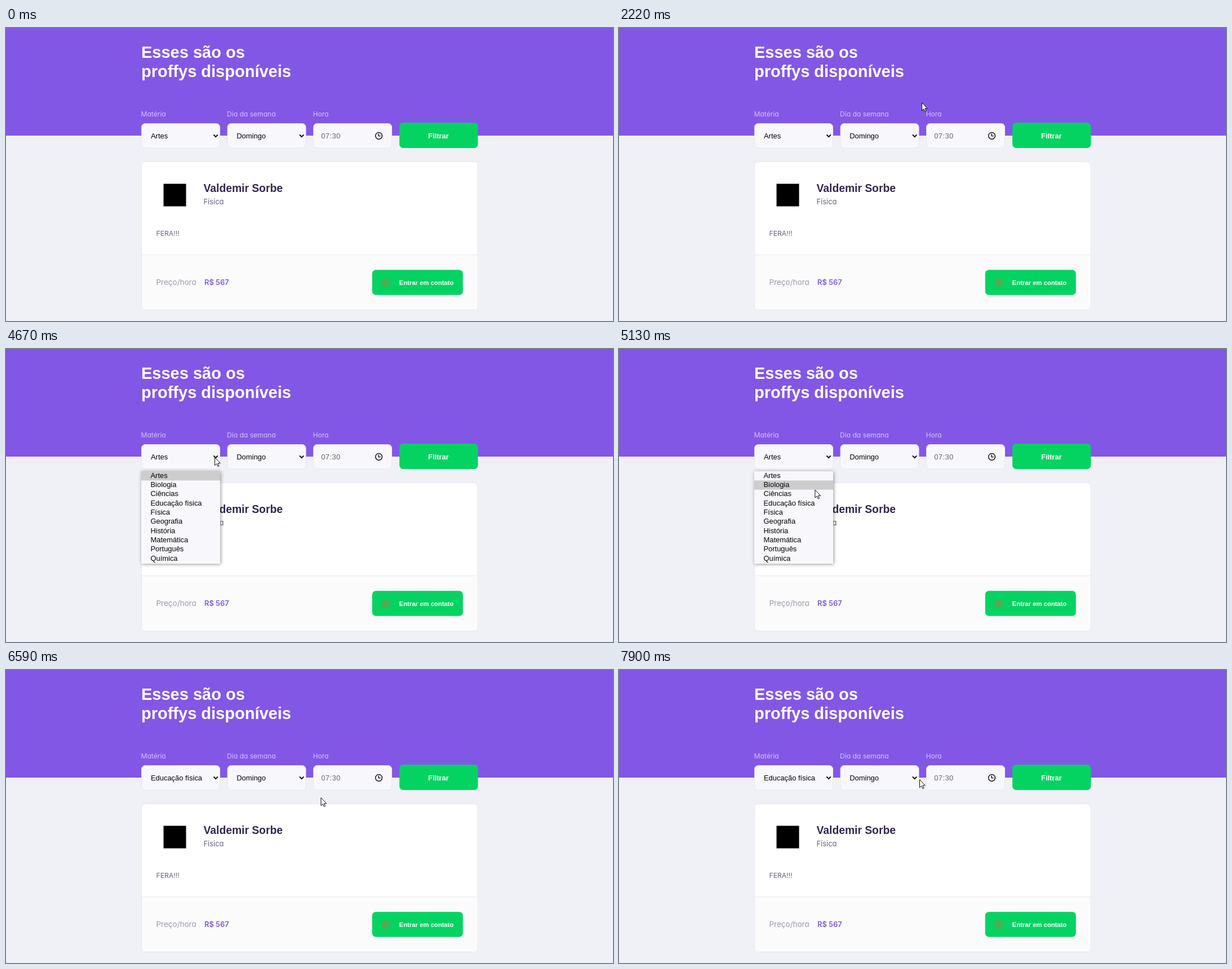
These frames come from a looping animation (1077 px wide and 520 px high, 8 s). An HTML page:

```html
<!DOCTYPE html>
<html lang="pt-BR">
<head>
<meta charset="utf-8">
<title>Proffys disponíveis</title>
<style>
  html, body { margin: 0; width: 100%; height: 100%; overflow: hidden; background: #f0f0f7; }
  svg, #shell { position: absolute; left: 0; top: 0; }
  #shell {
    left: 240px; top: 217px; width: 140px; height: 163.5px;
    background: rgba(0, 0, 0, .008);
    box-shadow: 1px 1px 6px rgba(0, 0, 0, .42);
  }
  text { font: 12.9px "Liberation Sans", Arial, sans-serif; fill: #000; }
  .bold { font-weight: 700; fill: #fff; }
  .title { font-size: 29px; }
  .name { font-size: 19.3px; fill: #32264d; }
  .contact { font-size: 11.3px; }
  .time { fill: #666; letter-spacing: .4px; }
  .round { font-family: Inter, "Open Sans", sans-serif; font-feature-settings: "cv11"; fill: #6a6180; }
  .label { font-size: 12.1px; fill: #d4c2ff; }
  .bio { font-size: 12.2px; }
  .rate { font-size: 13.5px; fill: #9c98a6; }
  .price { font-weight: 600; fill: #8257e5; }
  .chevron { fill: none; stroke: #000; stroke-width: 1.9; }
</style>
</head>
<body>
<svg width="1077" height="520">
  <defs>
    <rect id="field" x="240.5" y="169.5" width="139" height="43.5" rx="6.5" fill="#f8f8fc" stroke="#e6e6f0"/>
    <g id="select">
      <use href="#field"/>
      <path class="chevron" d="M368.4 189.4l3.7 3.7 3.7-3.7"/>
    </g>
  </defs>

  <rect width="1077" height="191" fill="#8257e5"/>
  <text class="bold title" x="240" y="53">Esses são os</text>
  <text class="bold title" x="240" y="87">proffys disponíveis</text>

  <text class="round label" x="239.5" y="157">Matéria</text>
  <text class="round label" x="392" y="157">Dia da semana</text>
  <text class="round label" x="544.5" y="157">Hora</text>

  <use href="#select"/>
  <use href="#select" x="152.5"/>
  <use href="#field" x="305"/>
  <text id="subject" x="257" y="196">Artes</text>
  <text x="409.3" y="196">Domingo</text>
  <text class="time" x="559.3" y="196">07:30</text>
  <g fill="none" stroke="#000" stroke-width="1.4">
    <circle cx="661.5" cy="191.3" r="5.9"/>
    <path d="M661.2 187.6v4h3.4"/>
  </g>
  <rect id="filter" x="698" y="168" width="139.3" height="45" rx="6.5" fill="#04d361"/>
  <text class="bold" x="767.3" y="195.6" text-anchor="middle">Filtrar</text>

  <rect x="240.5" y="237.3" width="596.5" height="263.2" rx="6.5" fill="#fff" stroke="#e6e6f0"/>
  <path d="M241 402.5H836.5V494a6 6 0 0 1-6 6H247a6 6 0 0 1-6-6Z" fill="#fbfbfc"/>
  <path d="M241 402.5H836.5" stroke="#e6e6f0"/>
  <rect x="279.5" y="276.5" width="40" height="40"/>
  <text class="bold name" x="350.5" y="290.8">Valdemir Sorbe</text>
  <text class="round" x="350.5" y="312.6">Física</text>
  <text class="round bio" x="266.5" y="369">FERA!!!</text>
  <text class="round rate" x="266.5" y="455.5">Preço/hora</text>
  <text class="round price" x="352" y="455.5">R$ 567</text>
  <rect x="649.7" y="429.3" width="161" height="44.4" rx="6.5" fill="#04d361"/>
  <circle cx="673.8" cy="451.7" r="8" fill="#4caf50"/>
  <text class="bold contact" x="697.6" y="455.6">Entrar em contato</text>
</svg>

<div id="shell"></div>

<svg width="1077" height="520">
  <g id="list">
    <rect x="240" y="217" width="140" height="163.5" fill="#f8f8fc"/>
    <rect id="hover" x="240" width="140" height="16.35" fill="#cdcdcd"/>
  </g>
  <path id="cursor" d="M.5 .5V14.6L3.7 11.6 5.9 16.4 8 15.5 5.9 10.8H10.2Z" fill="#fff" stroke="#000" stroke-width=".95"/>
</svg>

<script>
const LOOP = 8000, STEP = 76, ROW = 16.35, TOP = 217;
const $ = id => document.getElementById(id);
const clamp = (v, lo, hi) => Math.min(hi, Math.max(lo, v));
const subjects = ["Artes", "Biologia", "Ciências", "Educação física", "Física",
  "Geografia", "História", "Matemática", "Português", "Química"];

subjects.forEach((name, i) => {
  const item = document.createElementNS("http://www.w3.org/2000/svg", "text");
  item.setAttribute("x", 256.5);
  item.setAttribute("y", TOP + 11.6 + i * ROW);
  item.textContent = name;
  $("list").append(item);
});

// Each move continues from where the one before ended; no end means a jump.
const moves = [
  { start: 980, to: [960, 458] },
  { start: 980, end: 1370, to: [540, 132] },
  { start: 2220, to: [537, 132] },
  { start: 2500, end: 3000, to: [371, 182] },
  { start: 4670, to: [370, 192] },
  { start: 4670, end: 5270, to: [346, 253] },
  { start: 5420, end: 5490, to: [341, 266] },
  { start: 6360, end: 7130, to: [772, 187] },
  { start: 7210, end: 7560, to: [245, 190] },
  { start: 7560, end: 7900, to: [533, 194] }
];

// The cursor is redrawn once per STEP and slows down towards its goal.
function cursorAt(t) {
  let pos = null;
  for (const { start, end = start, to } of moves) {
    if (t < start) break;
    if (t >= end) { pos = to; continue; }
    const p = Math.floor((t - start) / STEP) * STEP / (end - start);
    const eased = 1 - (1 - p) ** 2;
    pos = pos.map((v, i) => v + (to[i] - v) * eased);
  }
  return pos;
}

// Opacity rising to 1 in n equal hard steps.
const fade = (t, start, n) => clamp(Math.floor((t - start) / STEP + 1) / n, 0, 1);

function onFilter(t) {
  const pos = cursorAt(t);
  return pos && pos[0] >= 698 && pos[0] <= 837 && pos[1] >= 168 && pos[1] <= 213;
}

// Averaging the last 200 ms gives the hover transition.
function filterTint(t) {
  let n = 0;
  for (let i = 0; i < 10; i++) n += onFilter(t - i * 20) ? 1 : 0;
  return n / 10;
}

function draw(now) {
  const t = now % LOOP, pos = cursorAt(t);
  $("cursor").style.display = pos ? "" : "none";
  if (pos) $("cursor").setAttribute("transform", `translate(${pos})`);

  const open = 1 - fade(t, 5750, 3);
  $("shell").style.opacity = open * fade(t, 3710, 1);
  $("list").style.opacity = open * fade(t, 3890, 2);
  const row = pos ? clamp(Math.floor((pos[1] - TOP) / ROW), 0, 9) : 0;
  $("hover").setAttribute("y", TOP + row * ROW);
  $("subject").textContent = subjects[t >= 5750 ? 3 : 0];

  const h = filterTint(t);
  $("filter").setAttribute("fill", `rgb(4,${211 - 20 * h},${97 - 9 * h})`);
}

let origin;
function frame(now) {
  origin ??= now;
  draw(now - origin);
  requestAnimationFrame(frame);
}
draw(0);
requestAnimationFrame(frame);
</script>
</body>
</html>
```
